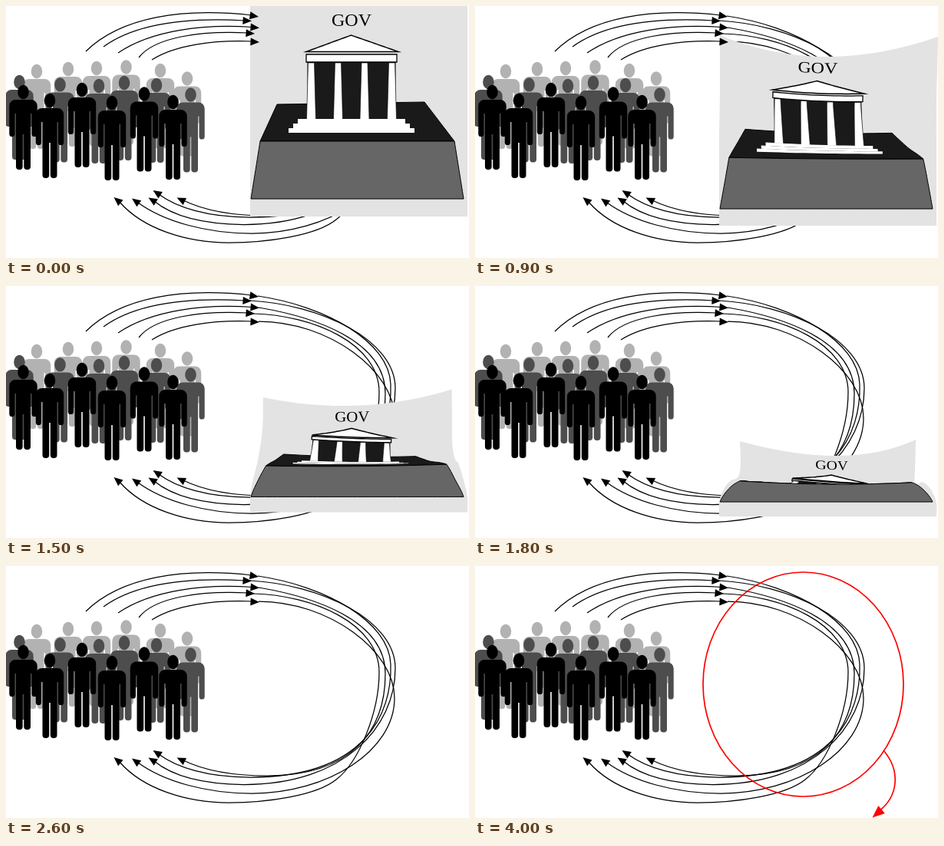
These frames come from a looping animation (603x328 px, 8 s). An HTML page with a canvas:

```html
<!DOCTYPE html>
<html lang="en">
<head>
<meta charset="utf-8">
<title>Crowd and sheet</title>
<style>
  html, body { margin: 0; width: 100%; height: 100%; overflow: hidden; background: #fff; }
  canvas { display: block; width: 603px; height: 328px; }
</style>
</head>
<body>
<canvas id="stage" width="603" height="328"></canvas>
<script>
const ctx = document.getElementById('stage').getContext('2d');
const LOOP = 8000, STEP = 100;
const INK = '#1a1a1a';
const clamp = (x, a, b) => Math.min(b, Math.max(a, x));
const mix = (a, b, k) => a + (b - a) * k;

// ---- Crowd: head centres, back row to front row ----
const ROWS = [
  ['#b2b2b2', [[40, 85], [81, 82], [118, 81], [156.5, 79.5], [201, 84], [236, 94.5]]],
  ['#4d4d4d', [[17.5, 99], [70.5, 102.5], [121, 104], [154, 100], [196, 103], [240.5, 115.5]]],
  ['#000', [[22.5, 112], [57, 123], [99, 109], [138, 126], [180, 114.5], [217.5, 125]]]
];

const person = new Path2D();
person.ellipse(0, 0, 7.3, 9.2, 0, 0, Math.PI * 2);
person.closePath();
person.roundRect(-18.2, 10, 36.4, 18, [8, 8, 0, 0]);
person.rect(-9.5, 20, 19, 35);
for (const x of [-18.2, 11]) person.roundRect(x, 20, 7.2, 38, [0, 0, 3.6, 3.6]);
for (const x of [-9.5, 0.8]) person.roundRect(x, 48, 8.7, 53, [0, 0, 4, 4]);

function drawCrowd() {
  for (const [color, heads] of ROWS) {
    ctx.fillStyle = color;
    for (const [x, y] of heads) {
      ctx.save();
      ctx.translate(x, y);
      ctx.fill(person);
      ctx.restore();
    }
  }
}

// ---- Arrows: path, tip x, tip y, heading in degrees ----
const OUTGOING = [
  ['M104 59C150 14 230 2 320 12', 329, 14, 9],
  ['M127 53C170 22 240 15 311 19', 320, 19.5, 3],
  ['M146 61C190 31 260 23 321 27.5', 330, 28.5, 5],
  ['M173 67C194 40 255 32 315 35', 324, 36, 4],
  ['M190 70C220 51 270 44 321 46', 330, 47, 3]
];
const RETURNING = [
  ['M328 13C416 26 499 72 501 128C503 190 470 275 318 275C262 275 222 262 199 245', 191.5, 240, 213],
  ['M318 19C410 24 507 70 507 133C507 210 440 284.5 310 284.5C260 284 220 276 193 254', 185.5, 249.5, 212],
  ['M329 28C400 40 494 70 494 140C494 215 450 273 340 273C295 273 260 267 231 253', 222.5, 249.5, 206],
  ['M322 36C400 38 486 75 486 138C486 190 460 255 430 278C404 299 340 308 290 308C235 308 178 290 148 255', 140.5, 249, 220],
  ['M329 46C420 46 506 110 506 172C506 240 420 296 320 296C260 296 205 280 172 256', 164, 250.5, 216]
];
for (const a of [...OUTGOING, ...RETURNING]) a[0] = new Path2D(a[0]);

function arrowHead(x, y, deg, len = 11.5, half = 5) {
  ctx.save();
  ctx.translate(x, y);
  ctx.rotate(deg * Math.PI / 180);
  ctx.beginPath();
  ctx.moveTo(0, 0);
  ctx.lineTo(-len, -half);
  ctx.lineTo(-len, half);
  ctx.fill();
  ctx.restore();
}

function drawArrows(list) {
  ctx.strokeStyle = ctx.fillStyle = '#000';
  ctx.lineWidth = 1.25;
  for (const [path, x, y, deg] of list) {
    ctx.stroke(path);
    arrowHead(x, y, deg);
  }
}

// ---- Falling sheet ----
const LEFT = 318, WIDTH = 283, HEIGHT = 274;
const LEVELS = [0, 37, 73, 147, 176, 215, 251, 274];
// Per level: y = height at the middle, l/r = lift of the side edges,
// a/b = inset of the side edges; missing values are 0. bow shifts the middle sideways.
const POSES = [
  { t: 400, y: LEVELS, l: [], r: [], a: [], b: [], bow: 0 },
  { t: 500, y: [9, 49, 82, 152, 180, 215, 251, 274],
    l: [-9, -3, -1, -2], r: [1, 0, 1, 1], a: [], b: [-2, -1], bow: 0 },
  { t: 900, y: [66, 97, 124, 181, 199, 232, 264, 286],
    l: [-28, -20, -14, -8, -2], r: [-26, -14, -4], a: [1, 1, 1], b: [-2, -1], bow: -5 },
  { t: 1300, y: [112, 144, 166, 207, 219, 246, 270, 291],
    l: [-5, -7, -6, -2, 2], r: [-21, -10, -3, -3, -3],
    a: [10, 9, 8, 5, 4, 2], b: [16, 15, 14, 11, 7, 3], bow: -6.5 },
  { t: 1800, y: [221, 246, 258, 262, 258, 264, 281, 300],
    l: [-19, -16, -12, -10, -5], r: [-21, -6, 5, -4, -3],
    a: [27, 28, 26, 19, 15, 6], b: [27, 28, 29, 24, 18, 8], bow: 13 },
  { t: 2200, y: [264, 270, 274, 279, 277, 281, 291, 306],
    l: [-14, -12, -8, -6, -4], r: [-14, -6, 2, -4, -3],
    a: [34, 34, 32, 24, 18, 7, 1], b: [34, 34, 34, 28, 20, 8, 2], bow: 14 },
  { t: 2500, y: [290, 294, 297, 299, 298, 299, 303, 311],
    l: [-5, -4, -3, -2, -1], r: [-5, -3, 0, -2, -1],
    a: [40, 40, 36, 26, 18, 7, 1], b: [40, 40, 38, 28, 20, 8, 2], bow: 14 }
];

function poseAt(t) {
  let i = 0;
  while (i < POSES.length - 2 && t > POSES[i + 1].t) i++;
  const p = POSES[i], q = POSES[i + 1];
  const k = clamp((t - p.t) / (q.t - p.t), 0, 1);
  const pose = { bow: mix(p.bow, q.bow, k) };
  for (const key of ['y', 'l', 'r', 'a', 'b'])
    pose[key] = LEVELS.map((_, j) => mix(p[key][j] || 0, q[key][j] || 0, k));
  return pose;
}

// Smooth curve through the values at LEVELS
function along(vals, v) {
  const last = LEVELS.length - 1;
  let i = 0;
  while (i < last - 1 && v > LEVELS[i + 1]) i++;
  const slope = j => {
    const lo = Math.max(0, j - 1), hi = Math.min(last, j + 1);
    return (vals[hi] - vals[lo]) / (LEVELS[hi] - LEVELS[lo]);
  };
  const h = LEVELS[i + 1] - LEVELS[i], s = (v - LEVELS[i]) / h;
  const s2 = s * s, s3 = s2 * s;
  return vals[i] * (2 * s3 - 3 * s2 + 1) + vals[i + 1] * (3 * s2 - 2 * s3) +
    h * (slope(i) * (s3 - 2 * s2 + s) + slope(i + 1) * (s3 - s2));
}

function makeWarp(pose) {
  return (x, v) => {
    const u = (x - LEFT) / WIDTH;
    const left = LEFT + along(pose.a, v);
    const right = LEFT + WIDTH - along(pose.b, v);
    const bow = pose.bow * clamp((200 - v) / 120, 0, 1);
    return [
      mix(left, right, u) + bow * 4 * u * (1 - u),
      along(pose.y, v) + along(pose.l, v) * (1 - u) * (1 - 2 * u) + along(pose.r, v) * u * (2 * u - 1)
    ];
  };
}

function drawSheet(t) {
  const warp = makeWarp(poseAt(t));

  function shape(pts, fill, line = 0) {
    const cuts = 16;
    ctx.beginPath();
    pts.forEach(([x, y], i) => {
      const [x2, y2] = pts[(i + 1) % pts.length];
      for (let k = 0; k < cuts; k++)
        ctx.lineTo(...warp(mix(x, x2, k / cuts), mix(y, y2, k / cuts)));
    });
    ctx.closePath();
    ctx.fillStyle = fill;
    ctx.fill();
    if (line) {
      ctx.strokeStyle = '#000';
      ctx.lineWidth = line;
      ctx.stroke();
    }
  }
  const box = (x, y, x2, y2, fill, line) =>
    shape([[x, y], [x2, y], [x2, y2], [x, y2]], fill, line);

  function letter(ch, x, y) {
    const [px, py] = warp(x, y), [ax, ay] = warp(x + 4, y), [bx, by] = warp(x, y + 4);
    ctx.save();
    ctx.transform((ax - px) / 4, (ay - py) / 4, (bx - px) / 4, (by - py) / 4, px, py);
    ctx.fillText(ch, 0, 8);
    ctx.restore();
  }

  box(LEFT, 0, LEFT + WIDTH, HEIGHT, '#e3e3e3');

  ctx.fillStyle = '#000';
  ctx.font = '24px "Liberation Serif", serif';
  ctx.textAlign = 'center';
  [...'GOV'].forEach((ch, i) => letter(ch, 450 + (i - 1) * 17.33, 17.5));

  shape([[353, 128], [545, 125], [584, 176], [331, 176]], INK, 1);
  box(393, 72, 507, 148, INK, 1);
  for (const x of [397.5, 432.5, 467, 502.5])
    shape([[x - 4, 74], [x + 4, 74], [x + 6, 148], [x - 6, 148]], '#fff', 0.6);
  box(391, 63, 509, 73, '#fff', 1.3);
  shape([[391, 59.5], [449.5, 38], [511, 59.5]], '#fff', 1.5);
  [[380, 147], [374, 153], [368, 159]].forEach(([x, y]) =>
    box(x, y, 900 - x, y + 6, '#fff'));
  shape([[331, 176], [584, 176], [596, 251], [319, 251]], '#666', 1);
}

// ---- Red loop ----
const tail = new Path2D('M532 240C555 267 551 300 526 319');

function drawRed(alpha) {
  ctx.save();
  ctx.globalAlpha = alpha;
  ctx.strokeStyle = ctx.fillStyle = '#f00';
  ctx.lineWidth = 1.7;
  ctx.beginPath();
  ctx.ellipse(427.5, 154, 130.5, 146, 0, 0, Math.PI * 2);
  ctx.stroke();
  ctx.stroke(tail);
  arrowHead(517.5, 327.5, 139, 16, 6.5);
  ctx.restore();
}

function render(time) {
  const t = Math.floor((time % LOOP) / STEP) * STEP;
  ctx.fillStyle = '#fff';
  ctx.fillRect(0, 0, 603, 328);
  drawCrowd();
  drawArrows(RETURNING);
  if (t < 2600) drawSheet(t);
  drawArrows(OUTGOING);
  if (t >= 3600) drawRed(Math.min(1, (t - 3500) / 500));
}

const start = performance.now();
function tick() {
  render(performance.now() - start);
  requestAnimationFrame(tick);
}
tick();
</script>
</body>
</html>
```
